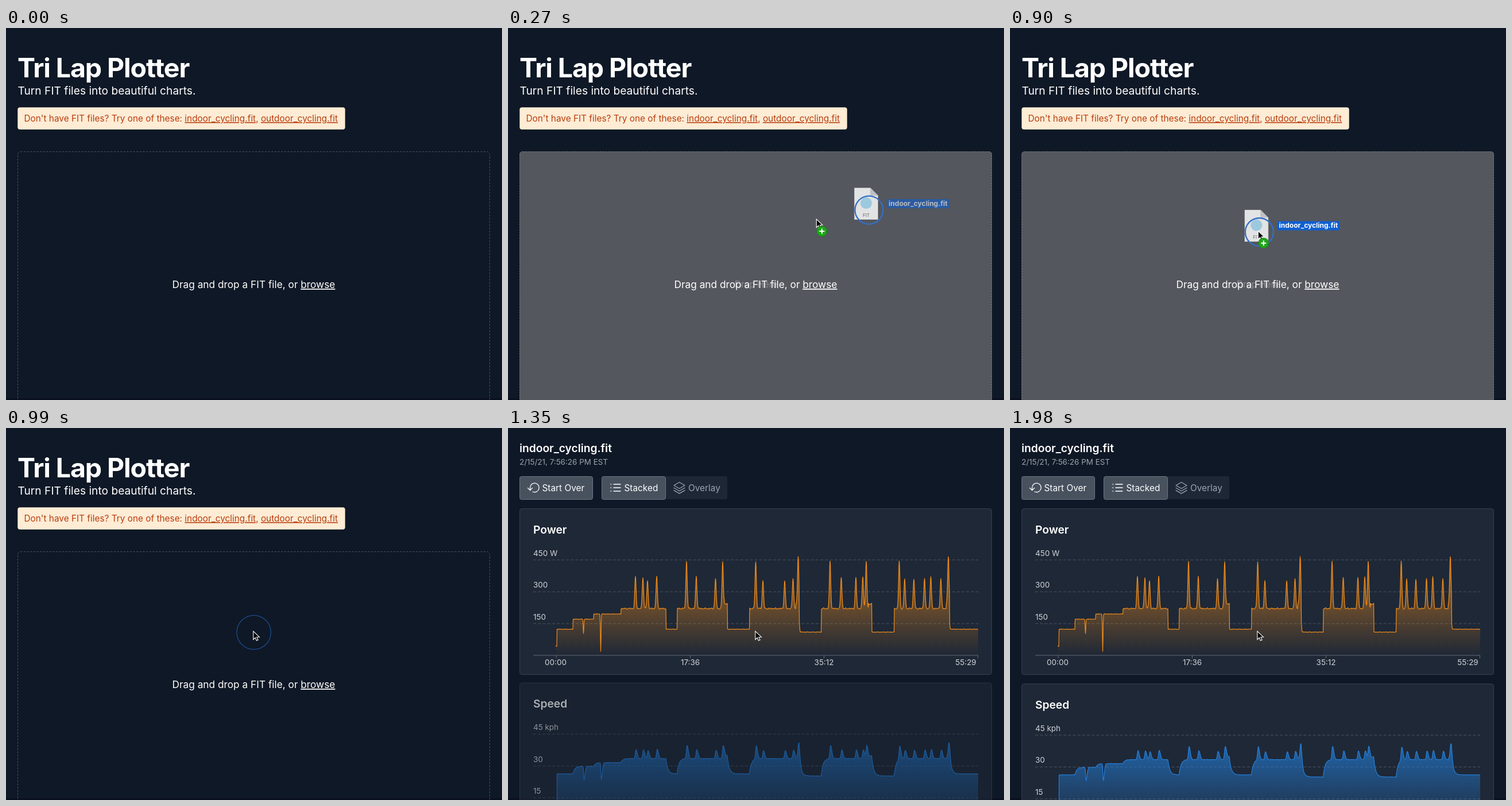
Recreate the animation shown at these times as an HTML page. Size 864 by 648 pixels, loop 2.61 s.

```html
<!DOCTYPE html>
<html lang="en">
<head>
<meta charset="utf-8">
<title>Tri Lap Plotter</title>
<style>
html, body { margin: 0; width: 100%; height: 100%; overflow: hidden; background: #0f1826; }
svg { display: block; font: 15.36px Inter, "Noto Sans", sans-serif; }
.small { font-size: 13.44px; }
.head { font-size: 19.2px; font-weight: 600; }
.link { text-decoration: underline; text-underline-offset: 2px; }
.mid { text-anchor: middle; }
.line { fill: none; stroke-width: 1.3; stroke-linecap: round; stroke-linejoin: round; }
</style>
</head>
<body>
<svg id="stage" width="864" height="648" viewBox="0 0 864 648" fill="#fff">
  <rect width="864" height="648" fill="#0f1826"/>
  <rect y="645" width="864" height="3" fill="#0a1020"/>

  <g id="upload">
    <text x="20" y="86" font-size="46.5" font-weight="700" letter-spacing="-1.1">Tri Lap Plotter</text>
    <text x="20.5" y="116" font-size="19.2">Turn FIT files into beautiful charts.</text>
    <rect x="20.3" y="138.3" width="570.4" height="38.4" rx="4" fill="#feecd5"/>
    <text x="31.5" y="163" fill="#b93d0c">Don't have FIT files? Try one of these: <tspan class="link">indoor_cycling.fit</tspan>, <tspan class="link">outdoor_cycling.fit</tspan></text>
    <rect x="20.5" y="215.5" width="822" height="460" rx="5" fill="none" stroke="#4a5360" stroke-dasharray="3.2 2.4"/>
    <g id="overlay">
      <rect x="20" y="215" width="823" height="460" rx="5" fill="#54575d"/>
      <rect x="20.5" y="215.5" width="822" height="460" rx="5" fill="none" stroke="#7d8086" stroke-dasharray="2.4 2.4"/>
      <text class="mid" x="432" y="452" fill="#8a8d92">Drop Here</text>
    </g>
    <text class="mid" x="431.5" y="453" font-size="17.28">Drag and drop a FIT file, or <tspan class="link">browse</tspan></text>
  </g>

  <g id="result">
    <text class="head" x="20" y="42">indoor_cycling.fit</text>
    <text class="small" x="20" y="64" fill="#9ca3af">2/15/21, 7:56:26 PM EST</text>
    <g fill="#48525f" stroke="#6b7482">
      <rect x="20.5" y="84.5" width="127" height="40" rx="3"/>
      <path d="M275 84H379a3 3 0 0 1 3 3V121a3 3 0 0 1-3 3H275z" fill="#1d2735" stroke="none"/>
      <rect x="163.5" y="84.5" width="111" height="40" rx="3"/>
    </g>
    <g class="line" stroke="#fff">
      <path d="M38.5 108V104a7.8 7.8 0 1 1 4.5 7M34.5 104.5l4 4 4-4"/>
      <path d="M184 98h12M184 104h12M184 110h12M179 98h.6M179 104h.6M179 110h.6"/>
      <path stroke="#9ca3af" d="M289 100l9.5-5.5 9.5 5.5-9.5 5.5zM289 104.3l9.5 5.5 9.5-5.5M289 108.6l9.5 5.5 9.5-5.5"/>
    </g>
    <text x="59.5" y="110">Start Over</text>
    <text x="202.5" y="110">Stacked</text>
    <text x="314" y="110" fill="#9ca3af">Overlay</text>
    <g id="power"></g>
    <g id="speed"></g>
  </g>

  <g id="file">
    <path d="M-26-39H2L16-25V17H-26z" fill="#e2e3e4" stroke="#44474c" stroke-width=".6"/>
    <path d="M2-39V-25H16z" fill="#bfc1c4"/>
    <circle cx="-5" cy="-12" r="10" fill="#9cc9de"/>
    <text class="mid" x="-5" y="12" font-size="8" fill="#666">FIT</text>
    <g id="label">
      <rect x="31" y="-19" width="109" height="16" rx="2" fill="#105fd0"/>
      <text class="mid" x="85.5" y="-7" font-size="12" font-weight="700">indoor_cycling.fit</text>
    </g>
  </g>
  <circle id="ring" fill="none"/>
  <g id="cursor">
    <path d="M0 0V14.5l3.4-3.2 2.2 5 2.6-1.1-2.2-5h4.6z" fill="#000" stroke="#fff" stroke-width="1.1"/>
    <g id="badge">
      <circle cx="9.5" cy="21" r="9" fill="#1fa51b" stroke="#15800f" stroke-width=".8"/>
      <path d="M9.5 16.5v9M5 21h9" stroke="#fff" stroke-width="2"/>
    </g>
  </g>
</svg>
<script>
const $ = id => document.getElementById(id);
const LOOP = 2610, STEP = 90;

// Workout: a stepped warm-up, then hard blocks with sprints and easy rests between them
const LEFT = 83, RIGHT = 819, WORK = 314.5, EASY = 350.5;
const warmup = x => x < 85.5 ? 380 : x < 113.5 ? EASY : x < 149.5 ? 333 : 324;
const blocks = [
  { from: 197, to: 275, sprints: [222, 235, 243, 259] },
  { from: 295, to: 382, sprints: [311, 328, 361.5, 374] },
  { from: 421, to: 507, sprints: [431.5, 444, 482, 496.5, 505.5] },
  { from: 546, to: 633.5, sprints: [561, 580.5, 606, 618, 624] },
  { from: 673, to: 769, sprints: [681.5, 691, 707, 725.5, 736.5, 754, 767] },
];
const dropouts = [{ at: 131.5, depth: 25 }, { at: 161.5, depth: 65 }];

// After the warm-up, each block opens and closes with its tallest sprint
const sprints = blocks.flatMap((b, i) => b.sprints.map((at, n) => ({
  at, height: i && (n === 0 || n === b.sprints.length - 1) ? 82 : 52 + 4 * Math.sin(at)
})));

const bell = (d, w) => Math.exp(-d * d / w / w);
const noise = x => Math.sin(x * .9) * Math.sin(x * .23 + 1) + .4 * Math.sin(x * 2.1);

function level(x) {
  const i = blocks.findLastIndex(b => b.from <= x);
  if (i < 0) return warmup(x);
  const left = blocks[i].to - x;
  if (left < 0) return i === 2 || i === 3 ? EASY + 5 : EASY;
  return i && left < 6 ? WORK - 8 : WORK;
}

function powerAt(x) {
  let y = level(x);
  y += noise(x) * (y < 320 ? 1 : .3);
  for (const s of sprints) y -= s.height * bell(x - s.at, 1.7);
  for (const d of dropouts) y += d.depth * bell(x - d.at, .8);
  return y;
}

// Speed follows power with inertia: quick to rise, slower to fall
let pace = 299;
function speedAt(x) {
  const lag = (at, rise, fall) => bell(x - at - 1, x < at + 1 ? rise : fall);
  pace += (299 + (level(x) - EASY) * .74 - pace) * .14;
  let y = pace + noise(x) * .25;
  for (const s of sprints) y -= s.height * .28 * lag(s.at, 1.8, 3);
  for (const d of dropouts) y += .9 * Math.min(d.depth, 32) * lag(d.at, 1, 2.5);
  return y;
}

function trace(from, f) {
  const pts = [];
  for (let x = from; x <= RIGHT; x += .5) pts.push(x + " " + f(x).toFixed(1));
  return pts.join("L");
}

function panel(id, title, unit, top, color, from, f, rise) {
  const path = trace(from, f);
  const grid = [3, 2, 1].map((n, i) => {
    const y = 229.8 + i * 55.5;
    return `<path d="M44 ${y}H${RIGHT}" stroke="#4b5462" stroke-dasharray="4.8 3.4"/>
      <text class="small" x="44" y="${y - 7}" fill="#d1d5db">${n * top / 3}${i ? "" : " " + unit}</text>`;
  }).join("");
  const times = [[83, "00:00"], [317.5, "17:36"], [550.5, "35:12"], [797.5, "55:29"]].map(([x, s]) =>
    `<text class="small mid" x="${x}" y="413" fill="#d1d5db">${s}</text>`).join("");
  $(id).innerHTML = `
    <linearGradient id="${id}Fade" x2="0" y2="1">
      <stop stop-color="${color}" stop-opacity=".7"/><stop offset="1" stop-color="${color}" stop-opacity="0"/>
    </linearGradient>
    <rect x="20.5" y="140.5" width="822" height="289" rx="4" fill="#1f2836" stroke="#374050"/>
    <text class="head" x="44" y="184">${title}</text>${grid}
    <path d="M${from} 396L${path}V396z" fill="url(#${id}Fade)"/>
    <path d="M${rise}${path}" fill="none" stroke="${color}" stroke-width="1.2" stroke-linejoin="round"/>
    <path d="M44 396H${RIGHT}M84 396v5M317.5 396v5M550.5 396v5M818.5 396v5" fill="none" stroke="#626b78"/>${times}`;
}
panel("power", "Power", "W", 450, "#f08c1a", LEFT, powerAt, "");
panel("speed", "Speed", "kph", 45, "#237fdb", 85.5, speedAt, "85.5 396L");

const show = (id, on) => $(id).style.display = on ? "" : "none";
const move = (id, x, y) => $(id).setAttribute("transform", `translate(${x} ${y})`);
const set = (id, attrs) => { for (const k in attrs) $(id).setAttribute(k, attrs[k]); };

// The pointer eases out toward its resting place in the drop zone
const REST = { x: 430.8, y: 354 };
function pointer(k) {
  const away = .54 ** (k - 3);
  return [REST.x + 106.5 * away, REST.y - 21 * away];
}

function reveal(id, age, y, slide) {
  const o = age < 0 ? 0 : [.12, .65][age] ?? 1;
  $(id).setAttribute("opacity", o);
  move(id, 0, y - (1 - o) * slide);
}

function draw(t) {
  const k = Math.floor(t / STEP);
  const drag = k >= 2 && k <= 10, released = k === 11, done = k >= 13;
  show("upload", !done);
  show("result", done);
  show("overlay", drag);
  show("file", drag);
  show("badge", drag);
  show("ring", drag || released);
  show("cursor", k >= 2);

  $("overlay").setAttribute("opacity", k === 2 ? .55 : 1);
  $("label").setAttribute("opacity", Math.min(1, .2 * k));
  move("cursor", ...(drag ? pointer(k) : [REST.x, REST.y]));

  // The dragged file trails the pointer by one step
  const [px, py] = drag ? pointer(k - 1) : [REST.x, REST.y];
  const x = px + .9, y = py + 2;
  move("file", x, y);
  set("ring", released
    ? { cx: x, cy: y, r: 29.7, stroke: "#1b4c8e", "stroke-width": 1.3 }
    : { cx: x, cy: y, r: 24.5, stroke: "#356fc6", "stroke-width": 2.3 });
  reveal("power", k - 13, 0, 1.1);
  reveal("speed", k - 14, 305.2, 5);
}

const start = performance.now();
function tick() {
  draw((performance.now() - start) % LOOP);
  requestAnimationFrame(tick);
}
tick();
</script>
</body>
</html>
```
